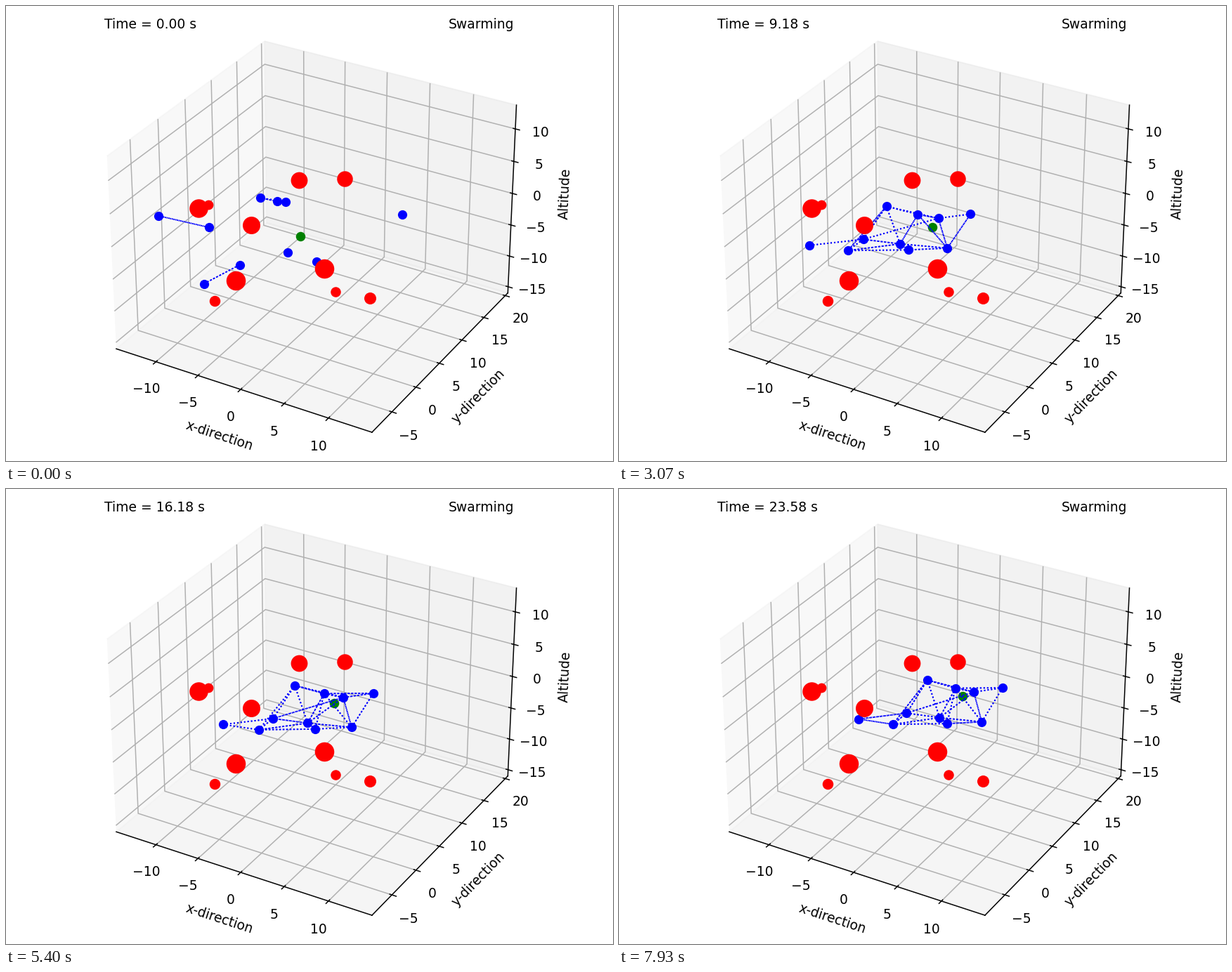
Write a matplotlib script that moves like this. It is 864 by 648 pixels and loops after 8 s.

```python
import numpy as np
import matplotlib.pyplot as plt
from matplotlib.animation import FuncAnimation
from matplotlib.collections import LineCollection

W, H, DPI = 864, 648, 135
FRAMES, LOOP = 120, 8000
LAST, MEET = FRAMES - 1, 46  # the swarm has met up at step MEET

# Leader in pixels: start and drift per step
LEADER, DRIFT = np.array([419, 327.7]), np.array([0.601, -0.28])

# Each agent's offset from the leader: at the start, at the end
AGENTS = {
    "a": [(-202, -29), (-148, 33)],
    "b": [(-130, -12.5), (-80, 24.5)],
    "c": [(-137, 68), (-99.5, 40.5)],
    "d": [(-86, 41), (-33, 31)],
    "e": [(-57, -54.5), (-50.5, -22.5)],
    "f": [(-32.5, -49.5), (-10.5, -11)],
    "g": [(-21, -49), (15.5, -5.5)],
    "h": [(-17.5, 23), (-22.5, 39.5)],
    "i": [(23, 36), (27, 37)],
    "j": [(145, -31), (56.5, -11.5)],
}
NAMES = list(AGENTS)
START, END = np.array(list(AGENTS.values()), float).swapaxes(0, 1)
# On meeting, the swarm is a little wider and lags behind its final place
MIDDLE = END * (1.12, 1) - (9, 7)

# Pairs in contact from the start, and pairs that join one after another
FIRST = "ab cd ef eg fg".split()
JOINING = "hi dh bc de di be bd df ch gi fi bg ce gj ij fj fh dg ac".split()

# x, y, diameter in pixels
OBSTACLES = [
    (274.5, 288, 26.5), (288.5, 283.3, 13.8), (349, 312, 25),
    (417, 248, 23.8), (482.5, 246, 22.5), (327.8, 391, 27.5),
    (297.5, 420.3, 15.5), (453.3, 374.3, 27.5), (469, 407, 14.5),
    (518.8, 416.2, 17),
]


def ease_out(u):
    return 1 - (1 - u) ** 1.5


def leader_at(n):
    return LEADER + DRIFT * n


def agents_at(n):
    if n < MEET:
        a, b, u = START, MIDDLE, n / MEET
    else:
        a, b, u = MIDDLE, END, (n - MEET) / (LAST - MEET)
    return leader_at(n) + a + (b - a) * ease_out(u)


def pairs_at(n):
    """Joining starts quickly and slows down as the swarm settles."""
    return FIRST + [p for k, p in enumerate(JOINING) if n >= 4 + k**3 / 80]


fig = plt.figure(figsize=(W / DPI, H / DPI), dpi=DPI)

box = fig.add_axes([0, 0, 1, 1], projection="3d")
limits = [(mid - 14.82, mid + 14.82) for mid in (0.01, 5.8, -1.2)]
box.set(xlim=limits[0], ylim=limits[1], zlim=limits[2],
        xticks=range(-10, 11, 5), yticks=range(-5, 21, 5),
        zticks=range(-15, 11, 5),
        xlabel="x-direction", ylabel="y-direction", zlabel="Altitude")
clock = box.text2D(0.05, 0.95, "", transform=box.transAxes)
box.text2D(0.95, 0.95, "Swarming", ha="right", transform=box.transAxes)

# Flat layer in pixel coordinates, y pointing down
layer = fig.add_axes([0, 0, 1, 1])
layer.set(xlim=(0.5, W + 0.5), ylim=(H, 0))
layer.axis("off")


def dots(color, size, zorder, x=(), y=()):
    return layer.plot(x, y, "o", color=color, ms=size * 72 / DPI, mew=0,
                      zorder=zorder)[0]


leader = dots("green", 13.5, 2)
links = layer.add_collection(
    LineCollection([], colors="blue", linestyles=":", linewidths=1, zorder=3),
    autolim=False)
agents = dots("blue", 13.2, 4)
for x, y, size in OBSTACLES:
    dots("red", size, 5, [x], [y])


def draw(n):
    clock.set_text(f"Time = {max(0, 0.2 * n - 0.02):.2f} s")
    spots = agents_at(n)
    at = dict(zip(NAMES, spots))
    # every pair is linked in both directions
    links.set_segments([[at[p], at[q]] for pair in pairs_at(n)
                        for p, q in (pair, pair[::-1])])
    agents.set_data(*spots.T)
    leader.set_data(*leader_at(n)[:, None])
    return clock, links, agents, leader


anim = FuncAnimation(fig, draw, frames=FRAMES, interval=LOOP / FRAMES,
                     repeat=True, repeat_delay=0, blit=False)
plt.show()
```
